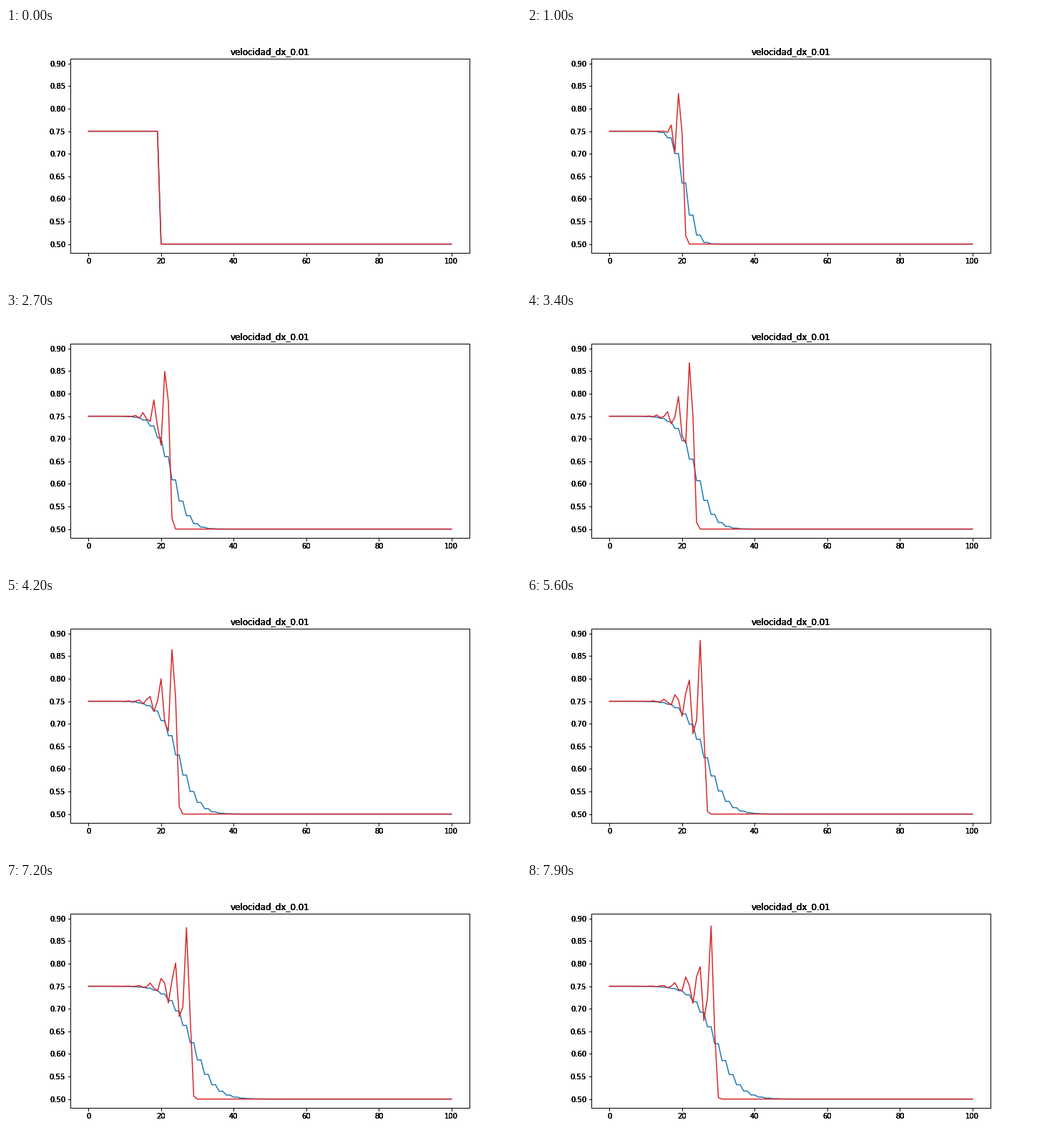
Write a matplotlib script that moves like this. It is 720 px wide and 360 px high and loops after 8000 ms.

```python
import numpy as np
import matplotlib.pyplot as plt
from matplotlib.animation import FuncAnimation

STEPS, CELLS, JUMP = 80, 101, 20
RATIO = 0.5  # dt / dx


def flux(rho):
    return rho * (1 - rho)


def lax_friedrichs(rho):
    new = rho.copy()
    f = flux(rho)
    new[1:-1] = (rho[2:] + rho[:-2]) / 2 - RATIO / 2 * (f[2:] - f[:-2])
    return new


def lax_wendroff(rho):
    """Two-step (Richtmyer) form."""
    new = rho.copy()
    half = (rho[1:] + rho[:-1]) / 2 - RATIO / 2 * np.diff(flux(rho))
    new[1:-1] = rho[1:-1] - RATIO * np.diff(flux(half))
    return new


def speeds(scheme):
    """Traffic speed 1 - rho at every time step."""
    rho = np.where(np.arange(CELLS) < JUMP, 0.25, 0.5)
    rows = []
    for _ in range(STEPS):
        rows.append(1 - rho)
        rho = scheme(rho)
    return np.array(rows)


smooth, sharp = speeds(lax_friedrichs), speeds(lax_wendroff)
low, high = sharp.min(), sharp.max()
pad = 0.05 * (high - low)

plt.rcParams["font.family"] = "DejaVu Sans"
fig = plt.figure(figsize=(10, 5), dpi=72, facecolor="white")
box = [0.125, 0.125, 0.775, 0.755]


def add_frame(**kw):
    ax = fig.add_axes(box, **kw)
    ax.set_xlim(-5, 105)
    ax.set_ylim(low - pad, high + pad)
    ax.tick_params(labelsize=10)
    ax.set_title("velocidad_dx_0.01", fontsize=12)
    return ax


ax = add_frame()
# Stacked copies harden the edges of text and frame.
for k in range(4):
    add_frame(facecolor="none", label=f"overlay{k}")

x = np.arange(CELLS)
blue, = ax.plot(x, smooth[0], color="tab:blue", lw=1.5)
red, = ax.plot(x, sharp[0], color="tab:red", lw=1.5)


def update(i):
    blue.set_ydata(smooth[i])
    red.set_ydata(sharp[i])
    return blue, red


anim = FuncAnimation(fig, update, frames=STEPS, interval=100,
                     repeat=True, repeat_delay=0, blit=False)
plt.show()
```
